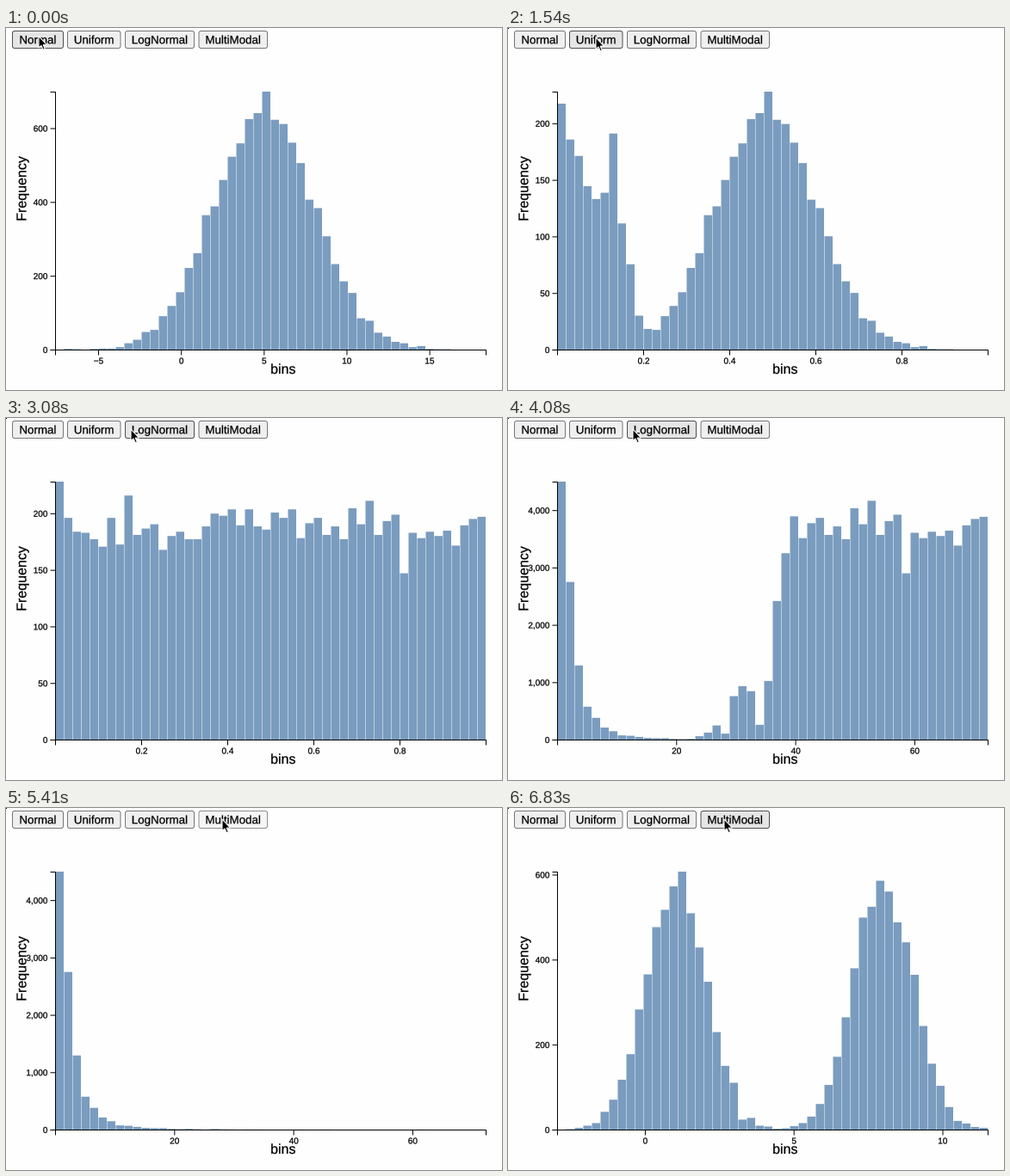
A matplotlib script that plays this animation: 576x421 px, repeating every 7.08 s.

```python
import numpy as np
import matplotlib.pyplot as plt
from matplotlib.animation import FuncAnimation
from matplotlib.collections import PolyCollection
from matplotlib.patches import FancyBboxPatch, PathPatch, Polygon, Rectangle
from matplotlib.textpath import TextPath
from matplotlib.transforms import Affine2D

W, H, DPI = 576, 421, 64
PX = 72 / DPI                       # points per pixel
LOOP, STEP = 7080, 20
LEFT, RIGHT, TOP, BASE = 57, 557, 74, 374
BINS, BIN_W = 50, 10
DELAY, DURATION = 20.45, 250        # stagger per bar and bar tween, ms
SAMPLES = 10000

plt.rcParams["font.family"] = "Liberation Sans"
rng = np.random.default_rng(5)

fig = plt.figure(figsize=(W / DPI, H / DPI), dpi=DPI, facecolor="#fefefe")
ax = fig.add_axes([0, 0, 1, 1])
ax.set_xlim(0, W)
ax.set_ylim(H, 0)
ax.axis("off")


def label(x, y, s, size, align=0.5, angle=0):
    """Text outlined by a hairline; align is 0 for left, 1 for right."""
    path = TextPath((0, 0), s, size=size)
    box = path.get_extents()
    place = (Affine2D().translate(-box.x0 - align * box.width, 0)
             .scale(1, -1).rotate_deg(angle).translate(x, y))
    return ax.add_patch(PathPatch(place.transform_path(path), color="black",
                                  lw=0.25 * PX, snap=False, zorder=4))


def line(xs, ys):
    return ax.plot(xs, ys, color="black", lw=PX, solid_capstyle="butt",
                   solid_joinstyle="miter", snap=False, zorder=3)[0]


class Histogram:
    """Bar heights and axis ticks of one sample set."""

    def __init__(self, start, data, low, width, peak, x_ticks, y_step):
        self.start = start
        counts, _ = np.histogram(data, low + width * np.arange(BINS + 1))
        self.heights = counts * (BASE - TOP) / counts.max()
        self.parts = []
        for v in x_ticks:
            x = LEFT + 0.5 + (v - low) * BIN_W / width
            text = f"{v:g}".replace("-", "\u2212")
            self.parts += [line([x, x], [BASE + 1, BASE + 6.5]),
                           label(x, BASE + 16.5, text, 10)]
        for v in range(0, peak, y_step):
            y = BASE + 0.5 - v * (BASE - TOP) / peak
            self.parts += [line([LEFT - 5.5, LEFT], [y, y]),
                           label(LEFT - 9, y + 3.4, f"{v:,}", 10, align=1)]

    def show(self, on):
        for part in self.parts:
            part.set_visible(on)


two_peaks = np.concatenate([rng.normal(m, 1, SAMPLES // 2) for m in (1, 8)])
STAGES = [
    Histogram(0, rng.normal(5, 3, SAMPLES), -7.6, 0.52, 699, range(-5, 16, 5), 200),
    Histogram(1324, rng.random(SAMPLES), 0, 0.02, 228, (0.2, 0.4, 0.6, 0.8), 50),
    Histogram(3512, rng.lognormal(0.5, 1, SAMPLES), 0, 1.446, 4497, (20, 40, 60), 1000),
    Histogram(5515, two_peaks, -2.95, 0.2894, 607, (0, 5, 10), 200),
]

line([LEFT - 5.5, LEFT + 0.5, LEFT + 0.5, LEFT - 5.5],
     [TOP + 0.5, TOP + 0.5, BASE + 0.5, BASE + 0.5])
line([LEFT + 0.5, LEFT + 0.5, RIGHT + 0.5, RIGHT + 0.5],
     [BASE + 6.5, BASE + 0.5, BASE + 0.5, BASE + 6.5])
label(322, 402, "bins", 16)
label(23.4, 186.3, "Frequency", 16, angle=-90)

bars = PolyCollection([], facecolor="#7a9cbf", linewidth=0, snap=False, zorder=2)
ax.add_collection(bars, autolim=False)
index = np.arange(BINS)
bar_x = LEFT + 0.5 + BIN_W * index

# button faces: (fill, border)
IDLE, HOVER, DOWN = ("#efefef", "#767676"), ("#e5e5e5", "#4f4f4f"), ("#f5f5f5", "#8d8d8d")
# name, left, right, time the mouse goes down
BUTTONS = [("Normal", 7.5, 66.5, None), ("Uniform", 71.5, 133, 1195),
           ("LogNormal", 138.5, 218.5, 3370), ("MultiModal", 224, 303.5, 5395)]
buttons = []
for (name, x0, x1, down), stage in zip(BUTTONS, STAGES):
    box = FancyBboxPatch((x0, 3.5), x1 - x0, 20, lw=PX,
                         boxstyle="round,pad=0,rounding_size=2.5")
    ax.add_patch(box)
    label((x0 + x1) / 2, 18.2, name, 13.333)
    buttons.append((box, x0, x1, down or stage.start, stage.start))

ARROW = np.array([(0, 0), (0, 13.6), (3, 10.9), (5.2, 15.8), (7.3, 14.9),
                  (5.2, 10.1), (9.5, 10.1)])
cursor = Polygon(ARROW, facecolor="black", edgecolor="white", lw=1.1 * PX, zorder=9)
ax.add_patch(cursor)
REST = (38, 9.5)
MOVES = [(400, 1170, (102, 11)), (2500, 3070, (145, 13)), (4780, 5390, (251, 13))]

corner = Rectangle((0, 0), 1, 1, color="black", lw=0)
ax.add_patch(corner)


def bounce(t):
    t = np.clip(t, 0, 1)
    arcs = [(0, 0), (6 / 11, 0.75), (9 / 11, 0.9375), (21 / 22, 0.984375)]
    return np.min([7.5625 * (t - c) ** 2 + low for c, low in arcs], axis=0)


def bar_heights(t):
    h = STAGES[0].heights
    for stage in STAGES[1:]:
        p = bounce((t - stage.start - DELAY * index) / DURATION)
        h = h + (stage.heights - h) * p
    return h


def cursor_at(t):
    pos = np.array(REST, float)
    for a, b, goal in MOVES:
        p = np.clip((t - a) / (b - a), 0, 1)
        pos += (np.array(goal) - pos) * p * p * (3 - 2 * p)
    return pos


def draw(frame):
    t = frame * STEP
    top = BASE - bar_heights(t)
    base = np.full(BINS, BASE)
    x0, x1 = bar_x, bar_x + BIN_W - 0.5
    bars.set_verts(np.stack([np.stack(p, -1) for p in
                             ((x0, base), (x0, top), (x1, top), (x1, base))], axis=1))

    current = sum(t >= s.start for s in STAGES) - 1
    for k, stage in enumerate(STAGES):
        stage.show(k == current)

    tip = cursor_at(t)
    cursor.set_xy(ARROW + tip)
    for box, left, right, down, up in buttons:
        face = DOWN if down <= t < up else HOVER if left <= tip[0] <= right else IDLE
        box.set_facecolor(face[0])
        box.set_edgecolor(face[1])
    corner.set_visible(t >= 40)
    return []


anim = FuncAnimation(fig, draw, frames=LOOP // STEP, interval=STEP,
                     repeat=True, repeat_delay=0, blit=False)
plt.show()
```
